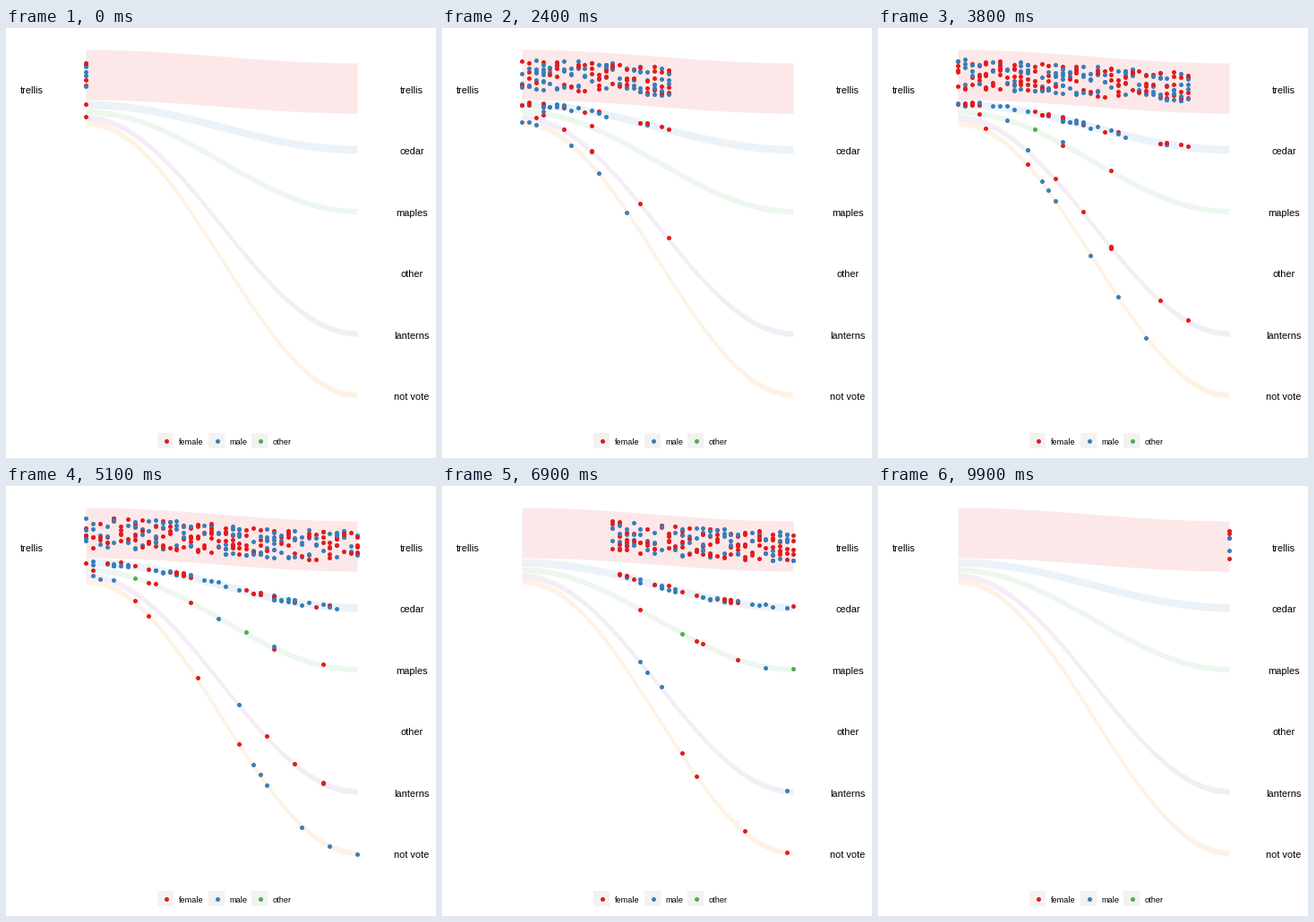
Animation, 480 px wide and 480 px high, one loop 10 s. Source, as a matplotlib script:

```python
import matplotlib.pyplot as plt
import numpy as np
from matplotlib.animation import FuncAnimation
from matplotlib.patches import Rectangle

SIZE, FRAMES, INTERVAL = 480, 100, 100
STEPS, LAST_START = 39, 48
LAST_TICK = STEPS + LAST_START
X0, X1 = 89, 392
DOT_AREA = (5 * 0.72) ** 2
FEMALE, MALE, OTHER = "#E41A1C", "#377EB8", "#4DAF4A"

plt.rcParams["font.family"] = "Liberation Sans"
rng = np.random.default_rng(12)

# left centre, right centre, thickness, fill
BANDS = {
    "trellis": (52, 67, 56, "#FCE8E8"),
    "cedar": (85.3, 135.5, 8.6, "#EBF2F8"),
    "maples": (93.5, 204.5, 6.4, "#EDF7ED"),
    "lanterns": (100.4, 341, 6.6, "#F4EDF6"),
    "not vote": (106.2, 409.6, 6.6, "#FFF2E5"),
}
LABELS = ["trellis", "cedar", "maples", "other", "lanterns", "not vote"]


def ease(t):
    return (1 - np.cos(np.pi * t)) / 2


dots = []  # (start tick, offset in band, left centre, right centre, colour)


def add(band, colour, *starts):
    left, right, thick, _ = BANDS[band]
    for start in starts:
        dots.append((start, rng.uniform(-0.3, 0.3) * thick, left, right, colour))


# Dense streams release a random handful of people on every tick
for start in range(LAST_START + 1):
    for band, count in [("trellis", rng.integers(5, 10)), ("cedar", rng.poisson(1.4))]:
        for _ in range(count):
            add(band, rng.choice([FEMALE, MALE]), start)

# Sparse streams: the few people who cross, by start tick
add("maples", FEMALE, 11, 18, 30, 35, 36, 44)
add("maples", MALE, 18, 26)
add("maples", OTHER, 22, 38)
add("lanterns", FEMALE, 0, 4, 11, 11, 15, 19)
add("lanterns", MALE, 23, 41, 43, 44)
add("not vote", MALE, 6, 10, 14, 19, 20, 21)
add("not vote", FEMALE, 23, 29, 36, 38)

order = rng.permutation(len(dots))
starts, offsets, lefts, rights = np.array([d[:4] for d in dots])[order].T
colours = np.array([d[4] for d in dots])[order]

fig = plt.figure(figsize=(SIZE / 100, SIZE / 100), dpi=100, facecolor="white")
ax = fig.add_axes([0, 0, 1, 1])
ax.set_xlim(0, SIZE)
ax.set_ylim(SIZE, 0)
ax.axis("off")


def text(x, y, s, px, ha):
    ax.text(x, y, s, fontsize=px * 0.72, ha=ha, va="baseline", color="black")


def draw_dots(x, y, colour):
    return ax.scatter(x, y, s=DOT_AREA, c=colour, linewidths=0, zorder=3)


t = np.linspace(0, 1, STEPS + 1)
for left, right, thick, fill in BANDS.values():
    mid = left + (right - left) * ease(t)
    ax.fill_between(X0 + (X1 - X0) * t, mid - thick / 2, mid + thick / 2,
                    color=fill, linewidth=0)

text(29, 73, LABELS[0], 11, "center")
for i, label in enumerate(LABELS):
    text(453, 73 + 68.4 * i, label, 11, "center")

for x, label, colour in [(178, "female", FEMALE), (235, "male", MALE), (283, "other", OTHER)]:
    ax.add_patch(Rectangle((x - 9, 452), 18, 17, facecolor="#F2F2F2", linewidth=0))
    draw_dots([x + 0.5], [460.5], colour)
    text(x + 14.5, 465, label, 9.2, "left")

moving = draw_dots(np.zeros(len(dots)), np.zeros(len(dots)), colours)
ticks = np.arange(LAST_TICK + 1)
tick_frames = np.round(ticks * (FRAMES - 1) / LAST_TICK)


def update(frame):
    age = np.interp(frame, tick_frames, ticks) - starts
    on = (age >= 0) & (age <= STEPS)
    p = age[on] / STEPS
    x = X0 + 0.4 + (X1 - X0) * p
    y = lefts[on] + (rights - lefts)[on] * ease(p) + offsets[on]
    moving.set_offsets(np.column_stack([np.round(x), np.round(y)]) + 0.5)
    moving.set_facecolor(colours[on])
    return (moving,)


anim = FuncAnimation(fig, update, frames=FRAMES, interval=INTERVAL, repeat=True, repeat_delay=0)
plt.show()
```
